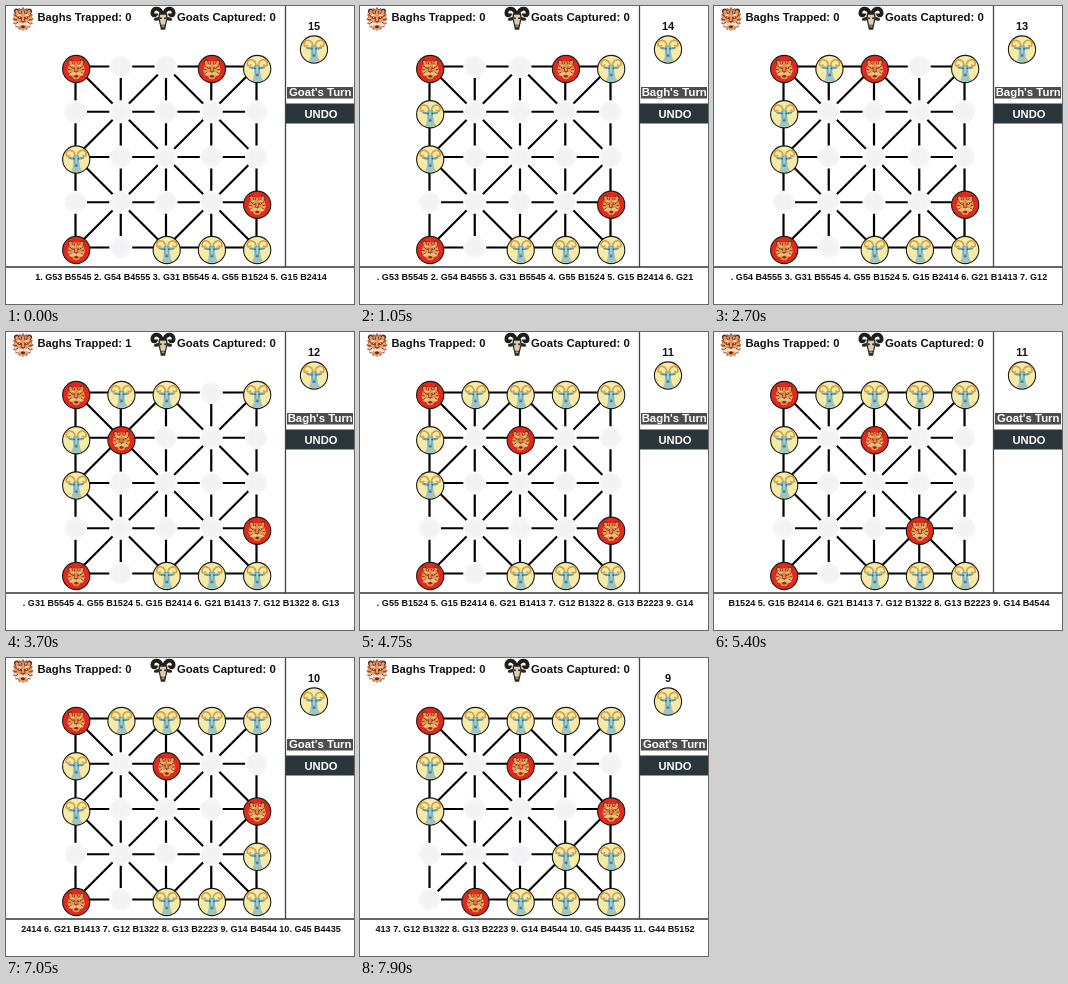
An HTML page with a canvas for the animation above (8000 ms loop, 348 by 298 pixels).

```html
<!DOCTYPE html>
<html lang="en">
<head>
<meta charset="utf-8">
<title>Baghchal</title>
<style>
  html, body { margin: 0; width: 348px; height: 298px; overflow: hidden; background: #fff; }
  canvas { display: block; }
</style>
</head>
<body>
<canvas id="stage"></canvas>
<script>
const W = 348, H = 298, LOOP = 8000;
const canvas = document.getElementById('stage');
const ctx = canvas.getContext('2d');
const dpr = window.devicePixelRatio || 1;
canvas.width = W * dpr;
canvas.height = H * dpr;
canvas.style.width = W + 'px';
canvas.style.height = H + 'px';

const INK = '#111';
const HISTORY = '1. G53 B5545 2. G54 B4555 3. G31 B5545 4. G55 B1524 5. G15 B2414';
const START = { 11: 'B', 14: 'B', 45: 'B', 51: 'B', 15: 'G', 31: 'G', 53: 'G', 54: 'G', 55: 'G' };
// Time in ms, then the move: G + cell places a goat, B + from + to moves a tiger.
const MOVES = [
  [400, 'G21'], [1150, 'B1413'], [1700, 'G12'], [2800, 'B1322'],
  [3450, 'G13'], [3950, 'B2223'], [4600, 'G14'], [4900, 'B4544'],
  [5700, 'G45'], [6650, 'B4435'], [7200, 'G44'], [7700, 'B5152']
];
const TRAPPED = [3450, 3950];

const STEP = 45.25;
const gridX = col => 69.5 + (col - 1) * STEP;
const gridY = row => 60.5 + (row - 1) * STEP;
// Pieces sit slightly below the crossings of the grid.
const pieceX = col => gridX(col) + 0.7;
const pieceY = row => gridY(row) + 2.5;

function stateAt(time) {
  const board = { ...START };
  let log = HISTORY, goats = 15, turn = 'Goat', number = 6;
  for (const [at, move] of MOVES) {
    if (at > time) break;
    if (move[0] === 'G') {
      board[move.slice(1)] = 'G';
      log += ` ${number++}. ${move}`;
      goats--;
      turn = 'Bagh';
    } else {
      delete board[move.slice(1, 3)];
      board[move.slice(3)] = 'B';
      log += ' ' + move;
      turn = 'Goat';
    }
  }
  const trapped = time >= TRAPPED[0] && time < TRAPPED[1] ? 1 : 0;
  return { board, log: log.slice(-70), goats, turn, trapped };
}

function text(str, x, y, size, align = 'left', color = INK) {
  ctx.font = `bold ${size}px "Liberation Sans", Arial, sans-serif`;
  ctx.textAlign = align;
  ctx.fillStyle = color;
  ctx.fillText(str, x, y);
}

function line(x1, y1, x2, y2, width = 2.2, color = '#000') {
  ctx.beginPath();
  ctx.moveTo(x1, y1);
  ctx.lineTo(x2, y2);
  ctx.lineWidth = width;
  ctx.strokeStyle = color;
  ctx.stroke();
}

function oval(x, y, rx, ry, fill, angle = 0) {
  ctx.beginPath();
  ctx.ellipse(x, y, rx, ry, angle, 0, Math.PI * 2);
  ctx.fillStyle = fill;
  ctx.fill();
}

function poly(points, fill) {
  ctx.beginPath();
  points.forEach(([x, y]) => ctx.lineTo(x, y));
  ctx.fillStyle = fill;
  ctx.fill();
}

function at(x, y, scale, draw) {
  ctx.save();
  ctx.translate(x, y);
  ctx.scale(scale, scale);
  draw();
  ctx.restore();
}

// Runs a drawing once for each side of the face.
function mirrored(draw) {
  for (const side of [-1, 1]) {
    ctx.save();
    ctx.scale(side, 1);
    draw();
    ctx.restore();
  }
}

function tigerFace(fur, cheek, stripe) {
  mirrored(() => {
    oval(5.8, -6.8, 2.6, 3.2, stripe, 0.4);
    oval(5.7, -6.5, 1.5, 2, fur, 0.4);
    poly([[0, -8], [5, -7.5], [7.8, -3], [9, 2], [7, 3], [7.5, 6], [4.5, 7], [2.5, 10], [0, 10.5]], fur);
    poly([[8.5, 2], [6.5, 6.5], [3.5, 7], [3.5, 3]], cheek);
    oval(3.6, -3.6, 1.7, 0.8, cheek, 0.3);
    oval(3.4, -1.2, 1.9, 1, stripe, -0.3);
    oval(3.3, -1.3, 0.7, 0.6, '#f1dc86');
    line(1.2, -7.5, 2, -4.6, 0.9, stripe);
    line(4.2, -7, 3.2, -4.8, 0.9, stripe);
    line(7.4, -3.4, 5.4, -2.2, 0.9, stripe);
    line(8.4, 0.6, 5.6, 0.8, 0.9, stripe);
    line(7.3, 4.6, 4.6, 3, 0.9, stripe);
    line(1.4, -2, 1.7, 3, 0.7, stripe);
    oval(1.8, 4.7, 1.9, 1.5, cheek);
  });
  poly([[-1.8, 2], [1.8, 2], [0, 4]], '#a8372e');
  oval(0, 7.4, 2, 1.3, stripe);
}

function curledHorns(color, width) {
  mirrored(() => {
    ctx.beginPath();
    ctx.moveTo(1.2, -3.5);
    ctx.bezierCurveTo(1.5, -10.5, 9.8, -11, 10, -5.5);
    ctx.bezierCurveTo(10, -2.2, 6.4, -2.6, 6.4, -4.8);
    ctx.lineWidth = width;
    ctx.strokeStyle = color;
    ctx.stroke();
  });
}

function blueGoat() {
  poly([[-3, 2], [3, 2], [4, 8], [6, 11.5], [0, 13], [-5, 11.5], [-3.5, 8]], '#9fc5c2');
  curledHorns('#d9a23f', 1.7);
  mirrored(() => oval(5, -1.2, 3.2, 1.2, '#6a9fae', -0.15));
  poly([[-2.8, -4], [2.8, -4], [3.4, -1], [2.2, 4], [1.8, 7.5], [-1.8, 7.5], [-2.2, 4], [-3.4, -1]], '#74adbb');
  poly([[-0.9, -3], [0.9, -3], [1, 4], [-1, 4]], '#a3cdd0');
  mirrored(() => oval(2.1, -0.8, 0.8, 0.7, '#35545e'));
  oval(0, 6.2, 1.4, 0.9, '#46798a');
}

function darkGoat() {
  curledHorns('#211e1a', 3.6);
  mirrored(() => oval(5.4, 0.4, 3.3, 1.6, '#2b2722', 0.25));
  poly([[-4, -5], [4, -5], [4.4, 0], [3, 6], [2, 10.5], [-2, 10.5], [-3, 6], [-4.4, 0]], '#2b2722');
  poly([[-2.7, -3.5], [2.7, -3.5], [3.1, 0], [1.9, 6], [-1.9, 6], [-3.1, 0]], '#dccdac');
  mirrored(() => oval(2, -0.3, 0.9, 0.9, '#1c1915'));
  oval(0, 7.4, 1.6, 1.1, '#a9977b');
}

// Ragged dark mane behind the bigger tiger of the header.
function mane() {
  const points = [];
  for (let i = 0; i < 32; i++) {
    const radius = i % 2 ? 9 : 11, angle = i * Math.PI / 16;
    points.push([Math.cos(angle) * radius * 0.92, Math.sin(angle) * radius * 1.04]);
  }
  poly(points, '#a66a55');
}

function disc(x, y, fill) {
  oval(x, y, 13.6, 13.6, fill);
  ctx.lineWidth = 1.1;
  ctx.strokeStyle = '#1c1c14';
  ctx.stroke();
}

function tigerPiece(x, y) {
  disc(x, y, '#e3291d');
  at(x, y, 0.98, () => tigerFace('#e39a50', '#edc384', '#8a2b18'));
}

function goatPiece(x, y) {
  disc(x, y, '#f6eaa8');
  at(x, y, 1, blueGoat);
}

function emptyNode(x, y) {
  const shade = ctx.createRadialGradient(x, y, 6, x, y, 11.5);
  shade.addColorStop(0, '#f3f2f4');
  shade.addColorStop(0.7, '#f6f5f7');
  shade.addColorStop(1, '#fff');
  oval(x, y, 11.5, 11.5, shade);
}

function drawBoard(board) {
  const link = (r1, c1, r2, c2) => line(gridX(c1), gridY(r1), gridX(c2), gridY(r2));
  for (let i = 1; i <= 5; i++) {
    link(i, 1, i, 5);
    link(1, i, 5, i);
  }
  link(1, 1, 5, 5);
  link(1, 5, 5, 1);
  link(1, 3, 3, 1);
  link(3, 1, 5, 3);
  link(5, 3, 3, 5);
  link(3, 5, 1, 3);

  for (let row = 1; row <= 5; row++) {
    for (let col = 1; col <= 5; col++) {
      const piece = board[`${row}${col}`];
      if (piece === 'B') tigerPiece(pieceX(col), pieceY(row));
      else if (piece === 'G') goatPiece(pieceX(col), pieceY(row));
      else emptyNode(gridX(col), gridY(row));
    }
  }
}

function drawHeader(trapped) {
  at(17, 13, 1.06, () => {
    mane();
    tigerFace('#ec9a62', '#f8e6d4', '#5c2c20');
  });
  text(`Baghs Trapped: ${trapped}`, 31.5, 15, 11.2);
  at(157, 12.5, 1.06, darkGoat);
  text('Goats Captured: 0', 171, 15, 11.4);
}

function drawSidebar(goats, turn) {
  line(279.5, 0, 279.5, 261, 1.3, '#444');
  text(goats, 308, 24, 11, 'center');
  goatPiece(308, 43.5);
  ctx.fillStyle = '#4d4d4d';
  ctx.fillRect(281, 81, 66, 11.5);
  text(`${turn}'s Turn`, 314.2, 90.2, 11.4, 'center', '#fff');
  ctx.fillStyle = '#2a363a';
  ctx.fillRect(280, 97.5, 68, 20);
  text('UNDO', 315, 111.7, 11.2, 'center', '#fff');
}

function render(time) {
  const { board, log, goats, turn, trapped } = stateAt(time);
  ctx.setTransform(dpr, 0, 0, dpr, 0, 0);
  ctx.fillStyle = '#fff';
  ctx.fillRect(0, 0, W, H);
  drawHeader(trapped);
  drawBoard(board);
  drawSidebar(goats, turn);
  line(0, 261, W, 261, 1.5, '#333');
  text(log, 175, 274, 9.05, 'center');
}

const began = performance.now();
function tick() {
  render((performance.now() - began) % LOOP);
  requestAnimationFrame(tick);
}
tick();
</script>
</body>
</html>
```
